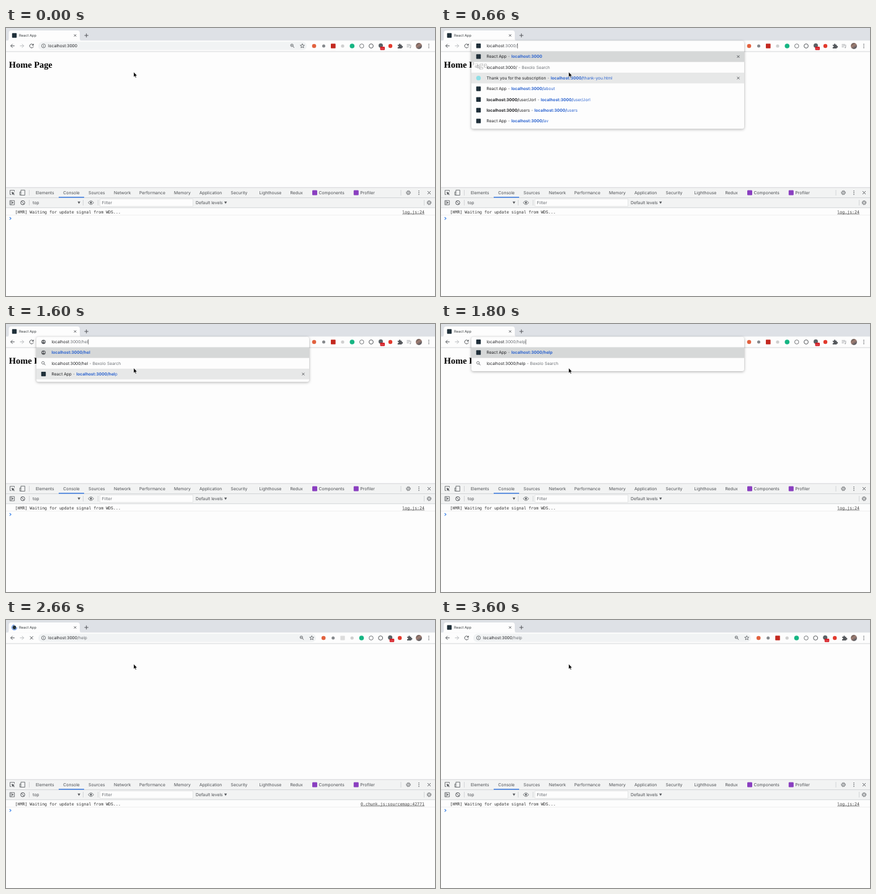
An HTML page that plays this animation: 692 by 432 pixels, repeating every 3800 ms.

```html
<!DOCTYPE html>
<html lang="en">
<head>
<meta charset="utf-8">
<title>Browser navigation</title>
<style>
  html, body { margin: 0; width: 100%; height: 100%; overflow: hidden; background: #fdfdfd; }
  svg { display: block; width: 692px; height: 432px; }
  text { font: 6.65px Inter, Roboto, sans-serif; fill: #202124; text-rendering: geometricPrecision; white-space: pre; }
  .title { font-size: 5.75px; fill: #3c4043; }
  .head { font: bold 14.4px "Liberation Serif", "Noto Serif", serif; fill: #000; }
  .mono { font: 6.58px "DejaVu Sans Mono", "Liberation Mono", monospace; fill: #303030; }
  .link { text-anchor: end; text-decoration: underline; fill: #444; }
  .tool { font-size: 6.85px; fill: #4a4d51; }
  .dim { fill: #6b6f74; }
  .sep { fill: #6b6f74; word-spacing: .35px; }
  .b { font-weight: 700; }
  .url { fill: #2b63cf; }
  .line { fill: none; stroke: #55585c; stroke-width: 1; }
  .thin { stroke-width: .8; }
  .rule { stroke: #cbcdd0; stroke-width: .8; }
  .solid { fill: #55585c; stroke: none; }
  .panel { filter: drop-shadow(0 1.5px 2px rgba(0, 0, 0, .32)); }
  [data-on] { visibility: hidden; }
</style>
</head>
<body>
<svg id="stage" viewBox="0 0 692 432" xmlns="http://www.w3.org/2000/svg"></svg>
<script>
const LOOP = 3800;
const stage = document.getElementById('stage');
const HOST = 'localhost:3000/';

const text = (x, y, s, cls = '') => `<text x="${x}" y="${y}" class="${cls}">${s}</text>`;
const span = (cls, s) => `<tspan class="${cls}">${s}</tspan>`;
const rect = (x, y, w, h, fill, r = 0) =>
  `<rect x="${x}" y="${y}" width="${w}" height="${h}" rx="${r}" fill="${fill}"/>`;
const dot = (x, y, r, fill) => `<circle cx="${x}" cy="${y}" r="${r}" fill="${fill}"/>`;
const ring = (x, y, r, cls = '') => `<circle cx="${x}" cy="${y}" r="${r}" class="line ${cls}"/>`;
const path = (d, cls = 'line') => `<path d="${d}" class="${cls}"/>`;
const rule = (x1, y1, x2, y2) => `<path d="M${x1} ${y1}L${x2} ${y2}" class="rule"/>`;
const at = (x, y, s) => `<g transform="translate(${x} ${y})">${s}</g>`;
// Visible from a to b; several intervals are separated by spaces.
const during = (on, s) => `<g data-on="${on}">${s}</g>`;

const cross = (x, y, r = 2.2) => path(`M${x - r} ${y - r}l${2 * r} ${2 * r}m0 ${-2 * r}l${-2 * r} ${2 * r}`);
const dots = (x, y) => [-2.7, 0, 2.7].map(d => dot(x, y + d, .8, '#55585c')).join('');
const gear = (x, y) => ring(x, y, 2.3, 'thin') +
  `<circle cx="${x}" cy="${y}" r="3.3" class="line" stroke-width="1.2" stroke-dasharray="1.3 1.29"/>` + dot(x, y, .7, '#55585c');
const lens = (x, y) => ring(x - .8, y - .8, 2.1, 'thin') + path(`M${x + .8} ${y + .8}l2.2 2.2`);
const globe = (x, y) => dot(x, y, 3.4, '#55585c') +
  `<path d="M${x - 2} ${y - 1.5}l2 .7l-.5 1.6l-1.6-.3zM${x + .6} ${y - 2.3}l1.7 1.3l-.4 2.4l-1.2-.9z" fill="#e4e5e6"/>`;
const site = (x, y) => rect(x - 3.7, y - 3.7, 7.4, 7.4, '#20303a', .8);
const star = (x, y) => {
  const pts = Array.from({ length: 10 }, (_, i) => {
    const a = i * Math.PI / 5 - Math.PI / 2, r = i % 2 ? 1.6 : 3.6;
    return [x + r * Math.cos(a), y + r * Math.sin(a)].map(v => v.toFixed(2)).join();
  });
  return `<polygon points="${pts.join(' ')}" class="line thin"/>`;
};

function tabStrip() {
  return rect(0, 0, 692, 20.5, '#dee1e6') +
    '<path d="M1 20.5Q4.5 20.5 4.5 17V8Q4.5 4 8.5 4H115Q119 4 119 8V17Q119 20.5 122.5 20.5Z" fill="#fdfdfd"/>' +
    during('0-2000 3060-3800', site(13.5, 12)) +
    during('2000-2330', '<path class="spin" d="M13.5 8.2A3.8 3.8 0 0 0 10.5 9.7" fill="none" stroke="#9aa0a6" stroke-width=".8"/>') +
    during('2330-3060', dot(13.5, 12, 2.9, '#20303a') +
      '<path class="spin" d="M13.5 8A4 4 0 1 0 17.5 12" fill="none" stroke="#3b78e7" stroke-width="1"/>') +
    text(21, 14.1, 'React App', 'title') + cross(111.5, 12, 1.7) +
    path('M126.5 12h6.4m-3.2-3.2v6.4');
}

function extensions() {
  return lens(462, 28.7) + path('M459.9 27.9h2.6', 'line thin') + star(478, 29) +
    dot(497, 29, 3.3, '#e2623f') + dot(512.5, 29, 2.5, '#85888c') +
    during('0-2460 3060-3800', rect(524, 25.2, 7.6, 7.6, '#c3281f', .8)) +
    during('2460-3060', rect(524.2, 25.4, 7.2, 7.2, '#dcdcdc', .8)) +
    dot(543, 29, 2.6, '#cfcfcf') + dot(558.3, 29, 3.8, '#16b583') +
    ring(573.8, 29, 3.3, 'thin') + ring(589, 29, 3.4) +
    dot(604.5, 28.3, 3.5, '#5b6266') + rect(603.6, 30.2, 7.4, 5.2, '#d5141c', 1) +
    [605.5, 607.3, 609.1].map(x => dot(x, 33, .5, '#fff')).join('') +
    dot(620, 29, 3.2, '#e23a2d') +
    path('M631.8 27h2.1a1.3 1.3 0 1 1 2.5 0h2v2.1a1.3 1.3 0 1 1 0 2.4v1.4h-6.6v-2a1.2 1.2 0 1 0 0-2.3z', 'solid');
}

function toolbar() {
  const pill = w => rect(52, 22.3, w, 13.2, '#f1f3f4', 6.6);
  return rect(0, 20.5, 692, 17.2, '#fdfdfd') + rule(0, 38, 692, 38) +
    path('M13.8 28.8H7.6m3-3l-3 3l3 3') +
    '<path d="M22.5 28.8h6.2m-3-3l3 3l-3 3" fill="none" stroke="#b9bcbf"/>' +
    during('0-2000 3060-3800', path('M43.8 27.2A3.1 3.1 0 1 0 44.2 29.8') + path('M44.7 25v3.2h-3.2z', 'solid')) +
    during('2000-3060', cross(41.2, 28.8, 2.5)) +
    during('0-2460', pill(433)) + during('2460-3800', pill(448)) +
    during('60-600', '<rect x="52" y="22.3" width="433" height="13.2" rx="6.6" fill="#fdfdfd" stroke="#6ea1ee"/>') +
    during('60-400', rect(67.8, 24.6, 48.6, 8.6, '#b7d6fb')) +
    during('0-600 2000-3800', ring(60.5, 28.8, 3.1, 'thin') + path('M60.5 28.3v2.1m0-3.6v.8', 'line thin')) +
    during('0-600', text(68, 31.2, 'localhost:3000')) +
    during('400-600', rect(116.4, 25, .6, 8, '#202124')) +
    during('2000-3800', text(68, 31.2, 'localhost:3000' + span('dim', '/help'))) +
    `<g id="ext">${extensions()}</g>` +
    during('0-2460', '<path d="M646.5 26.5h5.5m-5.5 2h5.5m-5.5 2h3.2m3.2-3.5v4.4" fill="none" stroke="#a5a8ab" stroke-width=".9"/>' + dot(652, 31.4, 1, '#a5a8ab')) +
    '<circle cx="666" cy="29" r="5" fill="url(#photo)"/>' + dots(682, 29);
}

function devtools() {
  const tabs = [[48, 'Elements'], [92.3, 'Console'], [133, 'Sources'], [174, 'Network'], [215, 'Performance'],
    [271, 'Memory'], [312, 'Application'], [362.5, 'Security'], [408.5, 'Lighthouse'], [458.5, 'Redux'],
    [504.5, 'Components'], [571.5, 'Profiler']];
  const arrow = x => path(`M${x} 279.7h4.4l-2.2 3.8z`, 'solid');
  const bars = [[37.5, 265.5], [637, 265.5], [37.5, 281.5], [124.5, 281.5], [148.5, 281.5], [674.5, 281.5]];
  return rect(0, 257, 692, 32.5, '#f2f3f3') + rule(0, 257.2, 692, 257.2) + rule(0, 273.6, 692, 273.6) +
    rule(0, 289.7, 692, 289.7) + bars.map(([x, y]) => rule(x, y - 4.5, x, y + 4.5)).join('') +
    tabs.map(([x, s]) => text(x, 268, s, 'tool')).join('') + rect(85, 272.2, 41, 1.4, '#2f74df') +
    rect(494, 261.5, 8, 8, '#8a3fc0', 1.2) + rect(560.8, 261.5, 8, 8, '#8a3fc0', 1.2) +
    path('M8.5 268.5H6.5v-6.8h7v2', 'line thin') + path('M9 264l5 2l-2 .8l1.8 2l-.8.8l-1.9-2l-.9 1.7z', 'solid') +
    path('M24 269.3h-1.7v-5h1.7m0 5.2v-8.2h6.4v8.2z', 'line thin') +
    gear(649, 265.5) + dots(666, 265.5) + cross(682.5, 265.5, 2.4) +
    path('M6.2 278.2h7.4v6.8h-7.4zm1.9 0v6.8', 'line thin') + path('M9.6 279.6l2.8 2l-2.8 2z', 'solid') +
    ring(27, 281.6, 3.3) + path('M24.7 279.3l4.6 4.6') +
    text(43, 284, 'top', 'tool') + arrow(115.5) +
    path('M132.6 281.6Q137 275.8 141.4 281.6Q137 287.4 132.6 281.6z', 'line thin') + dot(137, 281.6, 1.5, '#55585c') +
    '<rect x="151.7" y="275.7" width="150" height="11.8" fill="#fdfdfd" stroke="#d9dadb" stroke-width=".6"/>' +
    text(154.8, 284, 'Filter', 'tool dim') + text(306, 284, 'Default levels', 'tool') + arrow(352) + gear(682.5, 281.6) +
    during('0-2330 2460-3800', text(14.6, 298.6, '[HMR] Waiting for update signal from WDS...', 'mono')) +
    during('0-2330 3060-3800', text(675, 298.6, 'log.js:24', 'mono link')) +
    during('2460-3060', text(675, 298.6, '0.chunk.js:sourcemap:42771', 'mono link')) +
    '<path d="M0 301.6H692" stroke="#ececec" stroke-width=".8"/>' +
    '<path d="M5.8 305l2.3 2.1l-2.3 2.1" fill="none" stroke="#3b82e8" stroke-width="1.1"/>';
}

const dash = span('sep', ' - ');
const link = (strong, rest = '') => span('b url', strong) + span('url', rest);
const app = (strong, rest) => [site, 'React App' + dash + link(strong, rest)];
const search = q => [lens, HOST + q + span('sep', ' - Bexolo Search')];
const visited = p => [site, span('b', HOST) + p + dash + link(HOST, p)];

function panel(on, typed, icon, rows) {
  const pitch = 17.3, top = 37.4;
  const list = rows.map(([mark, label], i) => {
    const y = top + i * pitch, mid = y + 8.65;
    const fill = i === 0 ? '#d6d8d8' : i === 2 ? '#e7e8e8' : 'none';
    return rect(49, y, 440, pitch, fill) + mark(60.5, mid) + text(73.5, mid + 2.35, label) +
      (i === 2 || i === 0 && rows.length > 3 ? cross(479.5, mid, 1.9) : '');
  });
  return during(on,
    `<rect class="panel" x="49" y="20.8" width="440" height="${20.6 + rows.length * pitch}" rx="3.5" fill="#fdfdfd"/>` +
    icon(60.5, 28.8) +
    `<text x="73.5" y="31.2" class="typed">localhost${span('dim', ':3000/' + typed)}</text>` +
    rect(0, 24.8, .6, 8, '#202124').replace('<rect', '<rect class="caret"') + list.join(''));
}

function panels() {
  const paleLens = (x, y) => `<g opacity=".45">${lens(x, y)}</g>`;
  const typing = (on, q, rest) =>
    panel(on, q, globe, [[globe, link(HOST + q)], search(q), app(HOST + q, rest)]);
  return panel('600-1060', '', site, [
      app('localhost:3000'), [paleLens, search('')[1]],
      [(x, y) => dot(x, y, 3.7, '#8fdfe6'), 'Thank you for the subscription' + dash + link(HOST, 'thank-you.html')],
      app(HOST, 'about'), visited('user/Jorl'), visited('users'), app(HOST, 'av')]) +
    typing('1060-1330', 'h', 'elp') + typing('1330-1530', 'he', 'lp') + typing('1530-1730', 'hel', 'p') +
    panel('1730-2000', 'help', site, [app(HOST + 'help'), search('help')]);
}

const heading = text(4.8, 63.6, 'Home Page', 'head');
stage.innerHTML =
  '<defs><linearGradient id="photo" x2=".6" y2="1"><stop stop-color="#4b4745"/><stop offset=".5" stop-color="#a17f74"/><stop offset="1" stop-color="#53565e"/></linearGradient></defs>' +
  rect(0, 0, 692, 432, '#fdfdfd') + during('0-2330', heading) + tabStrip() + toolbar() + devtools() + panels() +
  `<g id="ghost">${heading}</g>` +
  at(206, 71, '<path d="M0 0V8L1.8 6.4L3 9.2L4.3 8.6L3.1 5.9H5.5Z" fill="#000" stroke="#fff" stroke-width=".5"/>');

for (const typed of stage.querySelectorAll('.typed')) {
  typed.nextElementSibling.setAttribute('x', 73.8 + typed.getComputedTextLength());
}

const timed = [...stage.querySelectorAll('[data-on]')].map(el =>
  ({ el, spans: el.dataset.on.split(' ').map(s => s.split('-').map(Number)) }));
const spinners = stage.querySelectorAll('.spin');
const ext = document.getElementById('ext');
const ghost = document.getElementById('ghost');

function draw() {
  const t = performance.now() % LOOP;
  for (const { el, spans } of timed) {
    el.style.visibility = spans.some(([a, b]) => t >= a && t < b) ? 'visible' : 'hidden';
  }
  for (const s of spinners) {
    const turn = t < 2330 ? 2130 - t : t - 2660;
    s.setAttribute('transform', `rotate(${turn * .36} 13.5 12)`);
  }
  ext.setAttribute('transform', `translate(${t < 2460 ? 0 : 15.2} 0)`);
  // The covered heading fades through the fresh panel.
  ghost.setAttribute('opacity', t < 600 ? 0 : Math.max(0, .25 * (1 - (t - 600) / 200)));
  requestAnimationFrame(draw);
}
draw();
</script>
</body>
</html>
```
